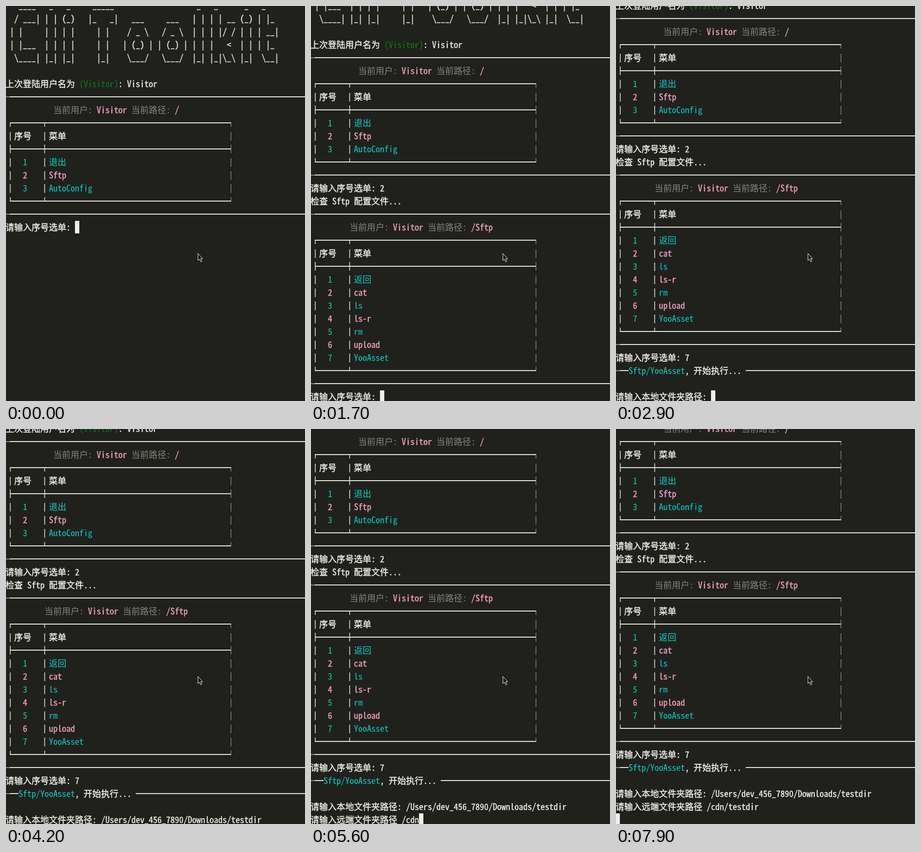
Animation of 620 by 818 pixels, one loop 8 s. Source, as an HTML page:

```html
<!DOCTYPE html>
<html lang="zh">
<head>
<meta charset="utf-8">
<title>Terminal menu</title>
<style>
  html, body { margin: 0; width: 100%; height: 100%; overflow: hidden; background: #20211c; }
  svg { display: block; width: 620px; height: 818px; }
  text {
    font: 18px "Noto Sans Mono CJK SC", "Noto Sans CJK SC", "Noto Sans CJK", "Noto Sans Mono", monospace;
    white-space: pre;
    stroke-width: .4px;
  }
  .white { fill: #f0f0ea; stroke: #f0f0ea; }
  .pink { fill: #f3a0c6; stroke: #f3a0c6; }
  .cyan { fill: #08cfc8; }
  .green { fill: #127a1c; }
  .grey { fill: #85857f; }
  .line { fill: #e4e4dd; }
  .dim { fill: #a9a9a3; }
</style>
</head>
<body>
<svg viewBox="0 0 620 818">
  <g id="screen"></g>
  <path d="M398 512.5V527l3.2-2.8 2.6 5.6 2.4-1.1-2.5-5.4h4z" fill="#111" stroke="#f4f4f0"/>
</svg>
<script>
const CELL = 9, ROW = 27, TOP = -14, LOOP = 8000;
const USER = 'Visitor';
const LOCAL = '/Users/dev_456_7890/Downloads/testdir';
const REMOTE = '/cdn/testdir';

const glyphs = {
  C: ['  ____ ', ' / ___|', '| |    ', '| |___ ', ' \\____|'],
  l: [' _ ', '| |', '| |', '| |', '|_|'],
  i: [' _ ', '(_)', '| |', '| |', '|_|'],
  T: [' _____ ', '|_   _|', '  | |  ', '  | |  ', '  |_|  '],
  o: ['       ', '  ___  ', ' / _ \\ ', '| (_) |', ' \\___/ '],
  k: [' _    ', '| | __', '| |/ /', '|   < ', '|_|\\_\\'],
  t: [' _   ', '| |_ ', '| __|', '| |_ ', ' \\__|'],
  ' ': [' ', ' ', ' ', ' ', ' ']
};

const span = ch => ch > '\u2e80' ? 2 : 1;
const cols = str => [...str].reduce((sum, ch) => sum + span(ch), 0);
const left = col => col * CELL - 1;
const rect = (x, y, w, h, cls = 'line') =>
  `<rect class="${cls}" x="${x}" y="${y}" width="${w}" height="${h}"/>`;

// Every character sits on the terminal grid; wide ones take two cells.
function gridX(col, str) {
  return [...str].map(ch => {
    const x = left(col);
    col += span(ch);
    return x;
  }).join(' ');
}

function text(col, str, cls = 'white', attrs = '') {
  const safe = str.replace(/</g, '&lt;');
  return `<text xml:space="preserve" class="${cls}" x="${gridX(col, str)}" y="20" ${attrs}>${safe}</text>`;
}

function runs(col, ...parts) {
  return parts.map(([str, cls]) => {
    const out = text(col, str, cls);
    col += cols(str);
    return out;
  }).join('');
}

const rule = () => rect(0, 12.5, 8, 1.5, 'dim') + rect(8, 12, 612, 2);
const posts = (y, h) =>
  rect(8, y, 1.5, h) + rect(79.5, y, 1.5, h) + rect(466, y, 1, h, 'dim');
const border = (y, h) => rect(8, 12, 459, 2) + posts(y, h);
const tableRow = body => posts(5, 18) + body;
const heading = (col, path) => runs(col,
  ['当前用户: ', 'grey'], [USER, 'pink'], [' 当前路径: ', 'grey'], [path, 'pink']);

function table(items) {
  return [
    border(13, 8),
    tableRow(text(2, '序号') + text(10, '菜单')),
    border(4, 18),
    ...items.map((name, i) => {
      const cls = i % 2 ? 'pink' : 'cyan';
      return tableRow(text(4, `${i + 1}`, cls) + text(10, name, cls));
    }),
    border(5, 8),
    rule()
  ];
}

const inputs = {};
const rows = [];
function prompt(label, answer) {
  const row = rows.length, col = cols(label);
  inputs[row] = { col, answer };
  rows.push(text(0, label) + text(col, answer, 'white', `id="in${row}"`));
}

for (let i = 0; i < 5; i++)
  rows.push(text(1, [...'Cli Toolkit'].map(ch => glyphs[ch][i]).join(' ')));
rows.push('',
  runs(0, ['上次登陆用户名为 ', 'white'], [`(${USER})`, 'green'], [`: ${USER}`, 'white']),
  rule(), heading(11, '/'), ...table(['退出', 'Sftp', 'AutoConfig']));
prompt('请输入序号选单: ', '2');
rows.push(text(0, '检查 Sftp 配置文件...'), rule(), heading(9, '/Sftp'),
  ...table(['返回', 'cat', 'ls', 'ls-r', 'rm', 'upload', 'YooAsset']));
prompt('请输入序号选单: ', '7');
rows.push(
  rect(0, 12.5, 8, 1.5, 'dim') + rect(8, 12, 18, 2) +
  runs(3, ['Sftp/YooAsset', 'cyan'], [', 开始执行... ', 'white']) +
  rect(269, 12, 351, 2), '');
prompt('请输入本地文件夹路径: ', LOCAL);
prompt('请输入远端文件夹路径 ', REMOTE);
rows.push('');

const screen = document.getElementById('screen');
screen.innerHTML = rows.map((body, r) =>
  `<g transform="translate(0 ${TOP + r * ROW})">${body}</g>`).join('') +
  '<rect id="cursor" class="white" stroke="none" width="9" height="26" style="stroke:none"/>';
const lines = [...screen.children].slice(0, rows.length);
const cursor = document.getElementById('cursor');
for (const row in inputs) inputs[row].node = document.getElementById('in' + row);

// Each step: start time, rows scrolled, active row, characters typed there.
const keys = [4900, 5050, 5250, 5500, 6000, 6250, 6450, 6600, 6750, 6900, 7050, 7350];
const steps = [
  [0, 0, 17, 0], [900, 0, 17, 1],
  [1300, 3, 33, 0], [2300, 3, 33, 1],
  [2800, 6, 36, 0], [3800, 6, 36, LOCAL.length],
  [4300, 7, 37, 0], ...keys.map((at, i) => [at, 7, 37, i + 1]),
  [7700, 8, 38, 0]
];

let shown;
function draw(time) {
  const t = time % LOOP;
  const step = steps.filter(s => s[0] <= t).pop();
  cursor.style.display = t >= 3950 && t < 4300 ? 'none' : '';
  if (step !== shown) {
    shown = step;
    const [, scroll, active, typed] = step;
    screen.setAttribute('transform', `translate(0 ${-scroll * ROW})`);
    lines.forEach((line, r) => { line.style.display = r > active ? 'none' : ''; });
    for (const row in inputs) {
      const { node, answer } = inputs[row];
      node.textContent = +row === active ? answer.slice(0, typed) : answer;
    }
    const col = inputs[active] ? inputs[active].col : 0;
    cursor.setAttribute('x', left(col + typed));
    cursor.setAttribute('y', TOP + active * ROW);
  }
}

const start = performance.now();
function tick() {
  draw(performance.now() - start);
  requestAnimationFrame(tick);
}
tick();
</script>
</body>
</html>
```
